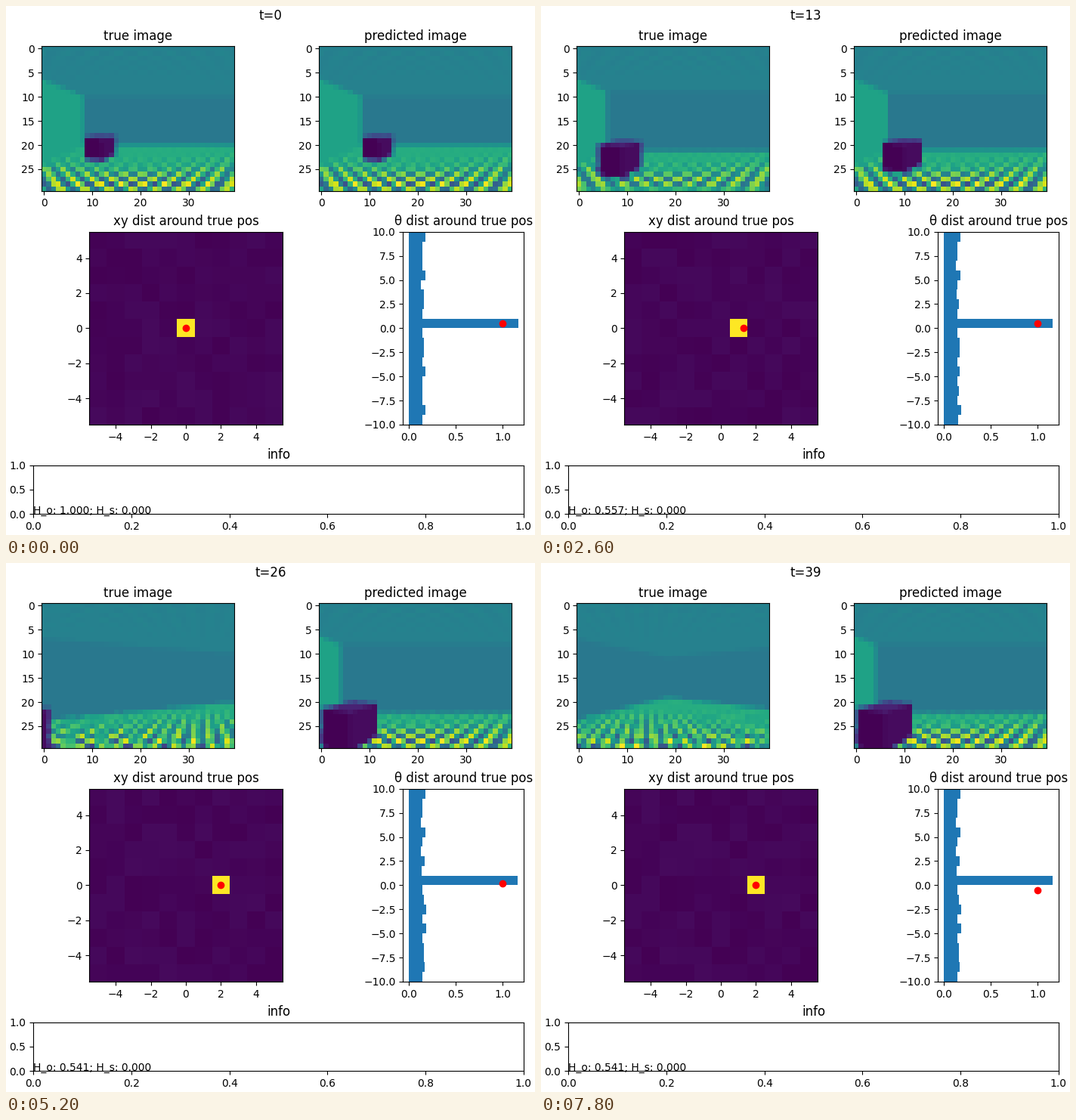
Recreate the animation shown at these times as a matplotlib script. Size 700 by 700 pixels, loop 8000 ms.

```python
import numpy as np
import matplotlib.pyplot as plt
from matplotlib.animation import FuncAnimation

SIZE = 700
FRAMES, STEP_MS = 40, 200
WALK = 20                        # steps forward before the turn begins
COLS, ROWS, SUB = 40, 30, 4
FOCAL = ROWS / 2 / np.tan(np.radians(30))

# Room: 10 x 10, eye 1.5 above the floor, ceiling 1.24 above the eye
ROOM, START, EYE, HEAD = 10, 3.0, 1.5, 1.24
TILE = 0.25
BOX_X, BOX_Z, BOX_HALF, BOX_TURN = 1.52, 7.9, 0.4, np.radians(67.4)
BOX_SHADES = np.array([0.0, 0.03, 0.1])

# Width of each heading bar from -10 to 9, per belief
HEADINGS = [
    [.150, .177, .150, .150, .150, .177, .150, .160, .165, .150,
     1.167, .145, .165, .160, .130, .177, .150, .145, .150, .177],
    [.155, .185, .150, .160, .150, .170, .150, .170, .170, .150,
     1.160, .150, .160, .140, .150, .177, .135, .150, .150, .177],
    [.150, .170, .160, .165, .150, .185, .150, .185, .165, .150,
     1.160, .140, .170, .135, .145, .177, .130, .150, .150, .177],
]
ENTROPY = [1.000, 0.557, 0.541]


def square_wave(x, blur):
    """Square wave of half period TILE, averaged over a window `blur` wide."""
    def ramp(v):
        return TILE - np.abs(v % (2 * TILE) - TILE)
    return (ramp(x + blur / 2) - ramp(x - blur / 2)) / blur


def checker(u, w, blur):
    return -square_wave(u, blur) * square_wave(w, blur)


def hit_box(z, du, dw, db):
    """Distance to the box along each ray (inf if missed) and its shade."""
    c, s = np.cos(BOX_TURN), np.sin(BOX_TURN)
    ou, ow = START - BOX_X, z - BOX_Z
    origin = [c * ou + s * ow, -s * ou + c * ow, EYE - BOX_HALF]
    rays = [c * du + s * dw, -s * du + c * dw, -db]
    near, far = [], []
    for o, d in zip(origin, rays):
        a, b = (-BOX_HALF - o) / d, (BOX_HALF - o) / d
        near.append(np.minimum(a, b))
        far.append(np.maximum(a, b))
    near = np.array(near)
    enter, leave = near.max(axis=0), np.min(far, axis=0)
    dist = np.where((enter < leave) & (enter > 0), enter, np.inf)
    return dist, BOX_SHADES[near.argmax(axis=0)]


def render(step, turn):
    """View after walking `step` units and turning right by `turn` degrees."""
    z, r = START + step, np.radians(turn)
    a = ((np.arange(COLS * SUB) + 0.5) / SUB - COLS / 2) / FOCAL
    b = ((np.arange(ROWS * SUB) + 0.5) / SUB - ROWS / 2) / FOCAL
    a, b = np.meshgrid(a, b)
    du = a * np.cos(r) + np.sin(r)
    dw = np.cos(r) - a * np.sin(r)

    with np.errstate(divide="ignore", invalid="ignore"):
        height = np.where(b > 0, EYE, HEAD)
        ground = height / np.abs(b)
        side = np.where(du > 0, ROOM - START, START) / np.abs(du)
        front = np.where(dw > 0, ROOM - z, z) / np.abs(dw)
        box, box_shade = hit_box(z, du, dw, b)

    # Tiles blur with distance, by half the depth one row covers
    blur = ground ** 2 / (FOCAL * height) / 2
    tiles = checker(START + ground * du, z + ground * dw, blur)
    flat = np.where(b > 0, 0.62 + 0.43 * tiles, 0.44 + 0.01 * tiles)
    wall = np.where((side < front) & (du < 0), 0.575, 0.40)
    shell = np.minimum(side, front)
    img = np.where(ground < shell, flat, wall)
    img = np.where(box < np.minimum(ground, shell), box_shade, img)
    return img.reshape(ROWS, SUB, COLS, SUB).mean(axis=(1, 3))


def belief_map(n):
    grid = np.random.default_rng(n + 4).uniform(0, 0.025, (11, 11))
    grid[5, 5 + n] = 1
    return grid


def pose(t):
    """Forward offset and number of turning steps at time t."""
    return 0.1 * min(t, WALK), max(t - WALK, 0)


def panel(left, top, width, height, title):
    ax = fig.add_axes([left / SIZE, 1 - (top + height) / SIZE,
                       width / SIZE, height / SIZE])
    ax.set_title(title)
    return ax


def show(ax, data, **kw):
    return ax.imshow(data, cmap="viridis", vmin=0, vmax=1, aspect="auto", **kw)


fig = plt.figure(figsize=(7, 7), dpi=100)
head = fig.suptitle("t=0", y=1 - 4.17 / SIZE)

predicted = [render(n, 0) for n in range(3)]
maps = [belief_map(n) for n in range(3)]

true_ax = panel(47.3, 53.3, 255, 191.3, "true image")
pred_ax = panel(414.3, 53.3, 255, 191.3, "predicted image")
xy_ax = panel(110.4, 298.75, 255.2, 255.2, "xy dist around true pos")
turn_ax = panel(525.3, 298.75, 160, 255.2, "θ dist around true pos")
info_ax = panel(36.2, 607.75, 648.6, 64.4, "info")

true_img = show(true_ax, predicted[0])
pred_img = show(pred_ax, predicted[0])
xy_img = show(xy_ax, maps[0], origin="lower", extent=(-5.5, 5.5, -5.5, 5.5))
xy_dot, = xy_ax.plot([0], [0], "ro")

bars = turn_ax.barh(np.arange(-10, 10), HEADINGS[0], height=1, align="edge")
turn_dot, = turn_ax.plot([1], [0.5], "ro")
turn_ax.set_xlim(-0.0584, 1.2255)
turn_ax.set_ylim(-10, 10)
info = info_ax.text(0, 0, "")


def update(t):
    step, turns = pose(t)
    n = min(t // 10, 2)
    head.set_text(f"t={t}")
    true_img.set_data(render(step, 3 * turns))
    pred_img.set_data(predicted[n])
    xy_img.set_data(maps[n])
    xy_dot.set_data([step], [0])
    for bar, width in zip(bars, HEADINGS[n]):
        bar.set_width(width)
    turn_dot.set_data([1], [0.5 - turns / 18])
    info.set_text(f"H_o: {ENTROPY[n]:.3f}; H_s: 0.000")
    return head, true_img, pred_img, xy_img, xy_dot, turn_dot, info, *bars


anim = FuncAnimation(fig, update, frames=FRAMES, interval=STEP_MS,
                     init_func=lambda: update(0), repeat=True, repeat_delay=0)
plt.show()
```
